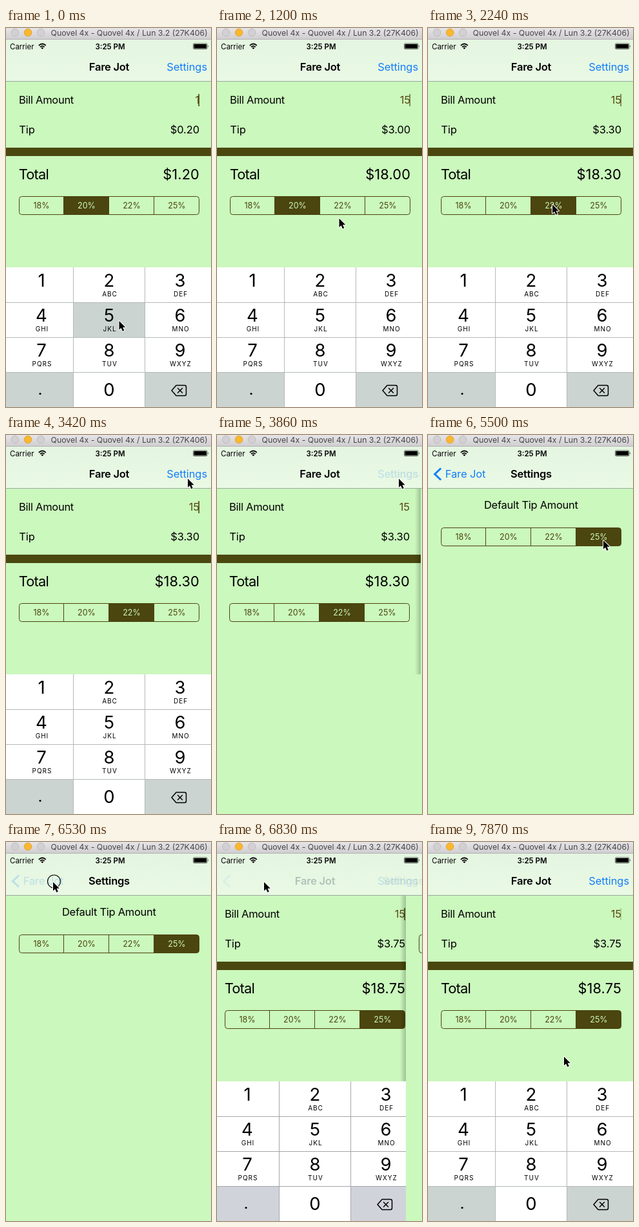
An HTML page that plays this animation: 318 px wide and 586 px high, repeating every 8000 ms.

```html
<!DOCTYPE html>
<html lang="en">
<head>
<meta charset="utf-8">
<title>Tip calculator</title>
<style>
  html, body { margin: 0; width: 100%; height: 100%; overflow: hidden; background: #cbf8bd; }
  svg { display: block; width: 100vw; height: 100vh; font-family: Inter, "Liberation Sans", sans-serif; --key: #cbd4d1; --rule: #b4bab8; }
  .body { font-size: 16.5px; letter-spacing: -.28px; }
  .num { font-size: 16.5px; letter-spacing: -.1px; text-anchor: end; }
  .big { font-size: 21.8px; letter-spacing: -.8px; }
  .sum { font-size: 21.8px; letter-spacing: .12px; text-anchor: end; }
  .head { font-size: 16.5px; font-weight: 600; letter-spacing: -.25px; text-anchor: middle; }
  .link { font-size: 16.5px; letter-spacing: -.1px; fill: #147efb; }
  .mid { text-anchor: middle; }
  .end { text-anchor: end; }
  .brown { fill: #5a4c14; }
  .seg { font-size: 12.5px; text-anchor: middle; }
  .digit { font-size: 27.5px; text-anchor: middle; }
  .letters { font-size: 10px; letter-spacing: 1px; text-anchor: middle; }
</style>
</head>
<body>
<svg viewBox="0 0 318 586" preserveAspectRatio="none">
  <defs>
    <linearGradient id="chrome" x2="0" y2="1">
      <stop stop-color="#e6e4e6"/><stop offset="1" stop-color="#d0ced0"/>
    </linearGradient>
    <linearGradient id="bar" x2="0" y2="1">
      <stop stop-color="#e4f5e1"/><stop offset="1" stop-color="#e9f9e4"/>
    </linearGradient>
    <linearGradient id="smoke">
      <stop stop-color="#c3c4c4" stop-opacity="0"/><stop offset=".4" stop-color="#c3c4c4"/>
    </linearGradient>
    <linearGradient id="edge">
      <stop stop-color="#000" stop-opacity="0"/><stop offset="1" stop-color="#000"/>
    </linearGradient>
    <clipPath id="round"><rect x=".5" y=".5" width="279" height="28" rx="4"/></clipPath>
  </defs>
  <rect width="318" height="586" fill="#cbf8bd"/>

  <g id="main">
    <text class="body" x="20" y="117">Bill Amount</text>
    <text class="num brown" id="bill" x="300" y="117"/>
    <rect id="caret" x="298.4" y="102" width="1.6" height="19" fill="#4b480f"/>
    <text class="num" style="text-anchor: start" x="20.2" y="163">Tip</text>
    <text class="num" id="tip" x="300" y="163"/>
    <rect y="185" width="318" height="13" fill="#4b480f"/>
    <text class="big" x="19.7" y="234">Total</text>
    <text class="sum" id="total" x="300" y="234"/>
    <g id="rates" transform="translate(20 260)"/>
    <g id="pad"/>
  </g>

  <g id="prefs">
    <rect id="shade" x="-9" y="83" width="9" height="287" fill="url(#edge)"/>
    <rect y="83" width="318" height="503" fill="#cbf8bd"/>
    <text class="body mid" x="159.8" y="114">Default Tip Amount</text>
    <g id="defaults" transform="translate(20 143)"/>
  </g>

  <rect y="17" width="318" height="66" fill="url(#bar)"/>
  <rect id="haze" x="197" y="17" width="121" height="65" fill="url(#smoke)"/>
  <path d="M0 82.5H318" stroke="#9aa899"/>
  <text class="head" id="title" y="66">Fare Jot</text>
  <text class="link end" id="open" x="312" y="66">Settings</text>
  <g id="back">
    <path d="M20 51.5L10.5 60.5L20 69.5" fill="none" stroke="#147efb" stroke-width="3"/>
    <text class="link mid" id="backText" y="66">Fare Jot</text>
  </g>
  <text class="head" id="title2" y="66">Settings</text>

  <text x="6" y="33" font-size="11.5">Carrier</text>
  <text class="mid" x="161.5" y="33" font-size="11.5" font-weight="600">3:25 PM</text>
  <path d="M50.8 27.2Q56.3 21.8 61.8 27.2M52.9 29.4Q56.3 26.2 59.7 29.4" fill="none" stroke="#000" stroke-width="1.7"/>
  <path d="M54.3 30.7Q56.3 29 58.3 30.7L56.3 32.8Z"/>
  <rect x="290.5" y="24" width="21.5" height="8.5" rx="1.5" fill="none" stroke="#000" stroke-width=".6"/>
  <rect x="291.5" y="25" width="19.5" height="6.5" rx=".6"/>
  <path d="M313 26.5q1.6 1.8 0 3.6z"/>

  <rect width="318" height="17" fill="url(#chrome)"/>
  <path d="M0 17.5H318" stroke="#b5b3b5"/>
  <g stroke-width=".8" fill="#d2d0d2" stroke="#b9b7b9">
    <circle cx="14" cy="7" r="5.8"/>
    <circle cx="34" cy="7" r="5.8" fill="#fab72f" stroke="#dd9d28"/>
    <circle cx="54" cy="7" r="5.8"/>
  </g>
  <text x="69.5" y="12" font-size="12.3" fill="#484648">Quovel 4x - Quovel 4x / Lun 3.2 (27K406)</text>

  <circle id="ring" cx="74.5" cy="61" r="10" fill="none" stroke="#000" stroke-width="1.2"/>
  <path id="cursor" d="M0 0V13.6L3.1 10.7L5.3 15.8L7.8 14.8L5.6 9.8H9.8Z"
        stroke="#fff" stroke-width="2" stroke-linejoin="round" paint-order="stroke"/>
</svg>

<script>
const LOOP = 8000, FRAME = 148.4;
const W = 318, PARALLAX = 100;
const RATES = [18, 20, 22, 25];

// Moments of the story, in ms
const TYPE = 140, RELEASE = 290, PICK = 1780, OPEN = 3700, PUSH = 3853, PREF = 5480, BACK = 6520, POP = 6611;

// Pointer strokes: from, to, x, y
const START = [175.5, 453];
const strokes = [
  [600, 890, 186, 316], [1040, 1335, 193, 273], [2380, 3410, 282, 67.5], [3930, 4550, 272, 163],
  [5490, 6230, 73, 62], [6830, 7270, 226, 262], [7430, 7860, 211, 332]
];

const $ = id => document.getElementById(id);
const root = document.querySelector("svg");
const clamp = k => Math.max(0, Math.min(1, k));
const ease = k => k * k * (3 - 2 * k);
const ramp = (t, from, length) => clamp((t - from) / length);
const within = (t, from, to) => t >= from && t < to;
const money = n => "$" + n.toFixed(2);

// Critically damped spring from 0 to 1
function spring(ms) {
  const x = Math.max(0, ms) * .0195;
  return 1 - (1 + x) * Math.exp(-x);
}

// Solid, then a short dip to nothing and back
function blink(age) {
  const u = age - 890;
  if (u < 0) return 1;
  return clamp(Math.abs(u % 1040 - 220) / 150 - .7);
}

function pointer(t) {
  return strokes.reduce(([x, y], [from, to, tx, ty]) => {
    const k = ease(ramp(t, from, to - from));
    return [x + (tx - x) * k, y + (ty - y) * k];
  }, START);
}

function segments(chosen) {
  const labels = RATES.map((rate, i) =>
    `<text class="seg" x="${35 + i * 70}" y="19" fill="${i === chosen ? "#cbf8bd" : "#4b450f"}">${rate}%</text>`);
  return `<rect x="${chosen * 70 - .5}" width="70.5" height="29" fill="#4b450f" clip-path="url(#round)"/>
    <rect x=".5" y=".5" width="279" height="28" rx="4" fill="none" stroke="#4b450f"/>
    <path d="M69.5 0V29M139.5 0V29M209.5 0V29" stroke="#4b450f"/>${labels.join("")}`;
}

function buildPad() {
  const letters = ["", "ABC", "DEF", "GHI", "JKL", "MNO", "PQRS", "TUV", "WXYZ"];
  const cols = [55, 160, 270];
  const keys = letters.map((s, i) => {
    const x = cols[i % 3], y = 370 + 54 * Math.floor(i / 3);
    return `<text class="digit" x="${x}" y="${y + 30}">${i + 1}</text>
      <text class="letters" x="${x + 1}" y="${y + 45}">${s}</text>`;
  }).join("");
  $("pad").innerHTML = `<rect y="370" width="318" height="216" fill="#fff"/>
    <path d="M0 532H104.5V586H0ZM215.5 532H318V586H215.5Z" fill="var(--key)"/>
    <rect id="press" x="105" y="424" width="110" height="54" fill="var(--key)"/>
    <path d="M0 424.5H318M0 478.5H318M0 532.5H318M104.5 370V586M215.5 370V586" stroke="var(--rule)"/>
    ${keys}
    <text class="digit" x="160" y="569">0</text>
    <circle cx="53" cy="565.5" r="1.6"/>
    <g fill="none" stroke="#000" stroke-width="1.5" stroke-linejoin="round" stroke-linecap="round">
      <path d="M264 552.5H277Q279.5 552.5 279.5 555V566Q279.5 568.5 277 568.5H264L257 560.5Z"/>
      <path d="M266.5 557L273.5 564M273.5 557L266.5 564"/>
    </g>`;
}

const shift = (id, x, y = 0) => $(id).setAttribute("transform", `translate(${x} ${y})`);
const setX = (id, x) => $(id).setAttribute("x", x);
const show = (id, opacity) => $(id).setAttribute("opacity", Number(opacity));

function fill(t) {
  const bill = t < TYPE ? 1 : 15;
  const pref = t < PREF ? 1 : 3;
  const rate = t < PICK ? 1 : t < BACK ? 2 : pref;
  const tip = bill * RATES[rate] / 100;
  $("bill").textContent = bill;
  $("tip").textContent = money(tip);
  $("total").textContent = money(bill + tip);
  $("rates").innerHTML = segments(rate);
  $("defaults").innerHTML = segments(pref);
}

function draw(t) {
  const p = spring(t - PUSH) - spring(t - POP);
  const moving = p > .0005 && p < .9995;
  const home = !within(t, PUSH, POP);
  fill(t);

  shift("main", Math.round(-PARALLAX * p));
  shift("prefs", Math.round(W * (1 - p)));
  show("shade", moving ? .22 : 0);
  show("pad", home);
  show("press", t < RELEASE);
  show("caret", within(t, OPEN, POP) ? 0 : blink(t < OPEN ? t + 140 : t - POP));

  // Titles slide with the screens; what arrives fades in late
  const title = 1 - ramp(t, PUSH, 300) + ramp(t, POP + 170, 230);
  const back = ramp(t, PUSH + 170, 230) - ramp(t, POP, 230);
  const pressed = (on, opacity) => on ? Math.min(opacity, .2) : opacity;
  setX("title", 160 - 102 * p);
  setX("backText", 160 - 102 * p);
  setX("title2", 160 + 140 * (1 - p));
  show("title", title);
  show("open", pressed(within(t, OPEN, POP), title));
  show("back", pressed(t >= BACK, back));
  show("title2", ramp(t, PUSH, 300) - ramp(t, POP, 230));
  show("haze", !home && moving && p > .5);

  root.style.setProperty("--key", moving ? "#d0d3da" : "#cbd4d1");
  root.style.setProperty("--rule", moving ? "#a3a6aa" : "#b4bab8");
  show("ring", within(t, BACK, POP));
  shift("cursor", ...pointer(t));
}

let last = -1;
function tick(now) {
  const n = Math.floor(now % LOOP / FRAME);
  if (n !== last) draw(n * FRAME);
  last = n;
  requestAnimationFrame(tick);
}

buildPad();
draw(0);
requestAnimationFrame(tick);
</script>
</body>
</html>
```
